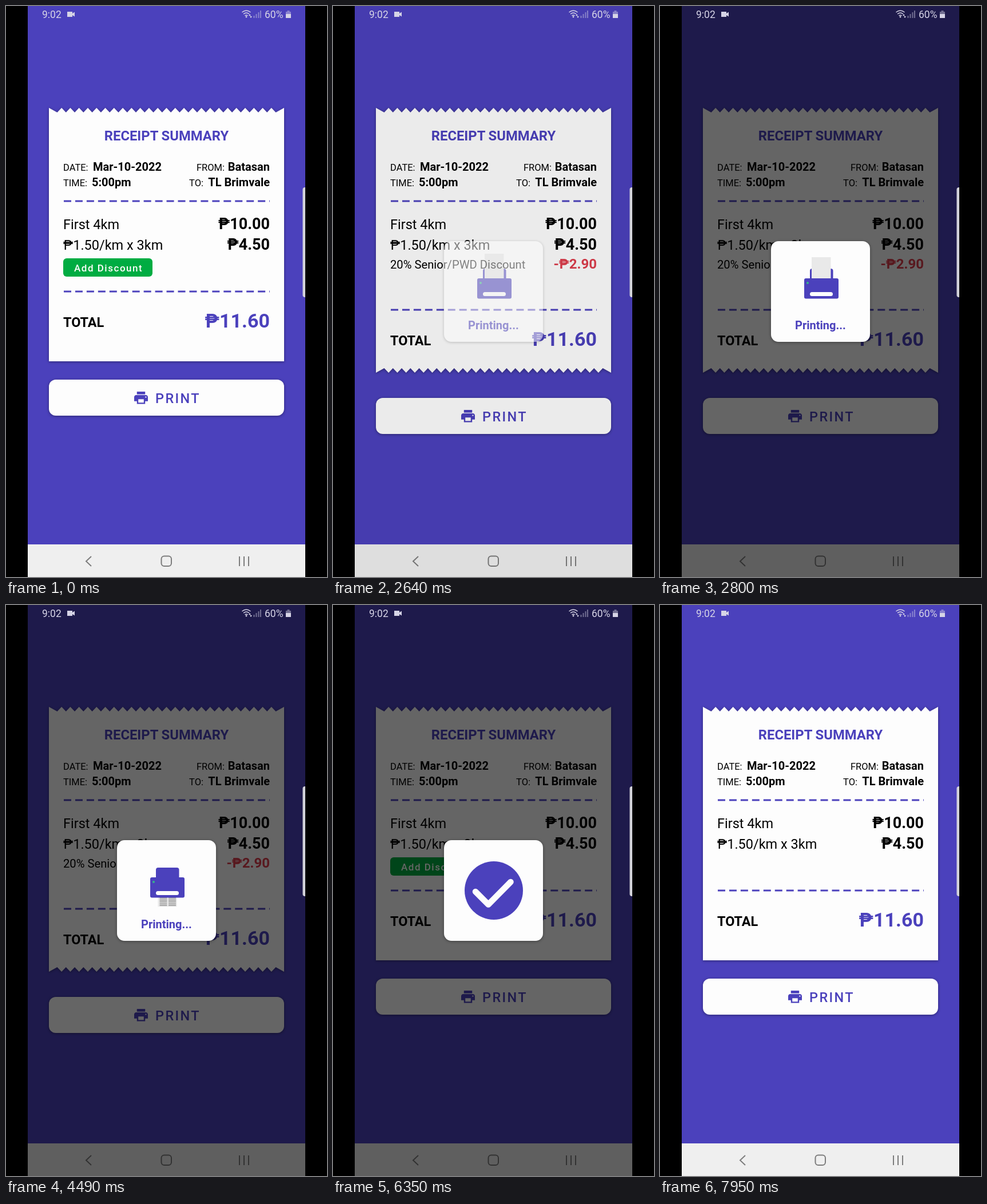
Animation of 561x998 px, one loop 7990 ms. Source, as an HTML page:

```html
<!DOCTYPE html>
<html lang="en">
<head>
<meta charset="utf-8">
<title>Receipt printing</title>
<style>
  html, body { margin: 0; width: 100%; height: 100%; overflow: hidden; background: #000; }
  svg { display: block; width: 100vw; height: 100vh; font-family: Roboto, sans-serif; }
  .b { font-weight: 700; }
  .m { font-weight: 500; }
  .end { text-anchor: end; }
  .purple { fill: #4b41bc; }
  .paper { fill: #fdfdfd; }
  .dash { stroke: #4b41bc; stroke-width: 3; stroke-dasharray: 13 6.95; }
  .shadow { filter: drop-shadow(0 1px 2.5px rgba(0, 0, 0, .4)); }
  .line { fill: none; stroke: #7d7d7d; stroke-width: 2; }
</style>
</head>
<body>
<svg viewBox="0 0 561 998">
  <defs>
    <clipPath id="phone"><rect x="38" width="485" height="998"/></clipPath>
    <clipPath id="above"><rect x="250" y="411" width="64" height="66"/></clipPath>
    <clipPath id="below"><rect x="250" y="511" width="64" height="36"/></clipPath>
  </defs>
  <rect width="561" height="998"/>
  <g clip-path="url(#phone)">
    <rect x="38" width="485" height="998" class="purple"/>
    <rect x="38" y="941" width="485" height="57" fill="#efefef"/>
    <g class="line">
      <path d="M149 962l-9 8.5 9 8.5M408 962v17M416 962v17M424 962v17"/>
      <rect x="271.5" y="961.5" width="17.5" height="17.5" rx="5"/>
    </g>

    <path id="receipt" class="paper shadow"/>
    <text x="280.5" y="235" font-size="23.8" class="b purple" text-anchor="middle">RECEIPT SUMMARY</text>
    <g font-size="16.5">
      <text x="100" y="288">DATE:</text>
      <text x="100" y="315">TIME:</text>
      <text x="382" y="288" class="end">FROM:</text>
      <text x="345" y="315" class="end">TO:</text>
    </g>
    <g font-size="20" class="b">
      <text x="152" y="288">Mar-10-2022</text>
      <text x="150" y="315">5:00pm</text>
      <text x="461" y="288" class="end">Batasan</text>
      <text x="461" y="315" class="end">TL Brimvale</text>
    </g>
    <path d="M101 341H461" class="dash"/>
    <g font-size="23.5">
      <text x="100" y="390">First 4km</text>
      <text x="100" y="426">₱1.50/km x 3km</text>
    </g>
    <g font-size="27" class="b end">
      <text x="461" y="390">₱10.00</text>
      <text x="461" y="426">₱4.50</text>
    </g>
    <g id="add">
      <rect x="100" y="441" width="156" height="32" rx="6" fill="#00ac42"/>
      <text x="119" y="464" font-size="17" letter-spacing="1.5" class="m" fill="#fff">Add Discount</text>
    </g>
    <g id="discount">
      <text x="100" y="459" font-size="20.2">20% Senior/PWD Discount</text>
      <text x="461" y="459" font-size="24" class="b end" fill="#dc3d4c">-₱2.90</text>
    </g>
    <g id="lower">
      <path d="M101 499H461" class="dash"/>
      <text x="100" y="561" font-size="23.5" class="b">TOTAL</text>
      <text x="461" y="561.5" font-size="34" class="b end purple">₱11.60</text>
      <g id="printButton">
        <rect x="75" y="653" width="411" height="63" rx="12" class="paper shadow"/>
        <path transform="translate(221.6 670.4) scale(1.2)" class="purple" fill-rule="evenodd"
          d="M19 8H5c-1.66 0-3 1.34-3 3v6h4v4h12v-4h4v-6c0-1.66-1.34-3-3-3zm-3 11H8v-5h8v5zm3-7c-.55 0-1-.45-1-1s.45-1 1-1 1 .45 1 1-.45 1-1 1zm-1-9H6v4h12V3z"/>
        <text x="261" y="694" font-size="23.5" letter-spacing="2.4" class="m purple">PRINT</text>
      </g>
    </g>

    <rect id="dim" x="38" width="485" height="998" opacity="0"/>

    <g id="dialog" opacity="0">
      <rect x="194" y="411" width="173" height="176" rx="13" class="paper shadow"/>
      <g id="printer">
        <rect x="262" y="459" width="40.5" height="24" rx="4" class="purple"/>
        <g clip-path="url(#above)"><rect id="sheetIn" x="265" width="33.5" height="60" fill="#e9e9e9"/></g>
        <g clip-path="url(#below)">
          <g id="sheetOut">
            <rect x="265.5" y="-50" width="33" height="50" fill="#e9e9e9"/>
            <path d="M275 -1.5V-40M290.5 -1.5V-40" stroke="#808080" stroke-width="13" stroke-dasharray="1.1 1.5"/>
          </g>
        </g>
        <rect x="252" y="476" width="60" height="35.5" rx="3" class="purple"/>
        <rect x="262" y="500" width="40" height="7" rx="3.5" class="paper"/>
        <circle cx="258" cy="484" r="2" fill="#35b58a"/>
        <text x="280.5" y="565" font-size="20" class="b purple" text-anchor="middle">Printing...</text>
      </g>
      <g id="success">
        <circle id="disc" cx="281" cy="499" class="purple"/>
        <path id="check" d="M249 501L271.5 523.5L310.5 484" pathLength="100" fill="none" stroke="#fdfdfd"
          stroke-width="10.5" stroke-linecap="round" stroke-linejoin="round"/>
      </g>
    </g>

    <g fill="#d6d4e6">
      <g font-size="17.5">
        <text x="63" y="21">9:02</text>
        <text x="452" y="21">60%</text>
      </g>
      <path d="M107 10h9v3l4 -2.5v8l-4 -2.5v3h-9z"/>
      <path d="M489 10h2.5v-2h4v2h2.5v11h-9z" opacity=".45"/>
      <path d="M489 14h9v7h-9z"/>
      <path d="M433.5 21v-4M437.5 21v-7M441.5 21v-10M445 21v-13" stroke="#d6d4e6" stroke-width="2" opacity=".45"/>
      <path d="M412.5 11q7.5 -6 15 0M415 14q5 -4 10 0M417.5 17q2.5 -2 5 0" fill="none" stroke="#d6d4e6" stroke-width="1.5"/>
      <circle cx="420" cy="19" r="1.4"/>
      <path d="M424 17l2 -3 2 3zM426 18h4l-2 3z"/>
    </g>
    <rect x="518.5" y="317" width="10" height="192" rx="4" fill="#d3d3da"/>
  </g>
</svg>
<script>
  const LOOP = 7990;
  const el = Object.fromEntries([...document.querySelectorAll('[id]')].map(e => [e.id, e]));
  const ramp = (t, from, to) => Math.min(1, Math.max(0, (t - from) / (to - from)));
  const easeOut = p => 1 - (1 - p) ** 3;
  const fade = (e, opacity) => e.setAttribute('opacity', opacity);
  const show = (e, on) => e.setAttribute('display', on ? 'inline' : 'none');

  // Zigzag edge from the left valley to the right one
  function teeth(peak, valley) {
    const count = 25, step = 382 / count, points = [];
    for (let i = 0; i <= count; i++) {
      const x = 89.5 + i * step;
      points.push([x, valley]);
      if (i < count) points.push([x + step / 2, peak]);
    }
    return points;
  }
  const topEdge = [[75, 178], ...teeth(178, 186), [486, 178]];
  const toPath = points => 'M' + points.join('L') + 'Z';
  const shortReceipt = toPath([...topEdge, [486, 621], [75, 621]]);
  const longReceipt = toPath([...topEdge, [486, 641], ...teeth(641, 633).reverse(), [75, 641]]);

  function draw(t) {
    const discounted = t >= 1530 && t < 5230;
    el.receipt.setAttribute('d', discounted ? longReceipt : shortReceipt);
    el.lower.setAttribute('transform', `translate(0 ${discounted ? 32 : 0})`);
    show(el.discount, discounted);
    show(el.add, !discounted);
    fade(el.add, t < 1530 ? 1 - ramp(t, 1380, 1470) : 1 - ramp(t, 7560, 7900));
    fade(el.printButton, 1 - .7 * (ramp(t, 2130, 2290) - ramp(t, 2340, 2600)));

    fade(el.dim, .6 * (ramp(t, 2620, 2795) - ramp(t, 6505, 6632)));
    fade(el.dialog, ramp(t, 2600, 2680) - ramp(t, 6508, 6597));

    show(el.printer, t < 5230);
    el.sheetIn.setAttribute('y', 433 + 43 * ramp(t, 2640, 3790));
    const fed = 511 + 18 * ramp(t, 3790, 4570) + 8 * ramp(t, 4600, 4900);
    el.sheetOut.setAttribute('transform', `translate(0 ${fed})`);
    fade(el.sheetOut, 1 - ramp(t, 4600, 4900));

    show(el.success, t >= 5230);
    el.disc.setAttribute('r', 51 * easeOut(ramp(t, 5210, 5800)));
    show(el.check, t > 5860);
    el.check.setAttribute('stroke-dasharray', `${100 * ramp(t, 5860, 6350)} 200`);
  }

  const startTime = performance.now();
  function animate() {
    draw((performance.now() - startTime) % LOOP);
    requestAnimationFrame(animate);
  }
  animate();
</script>
</body>
</html>
```
